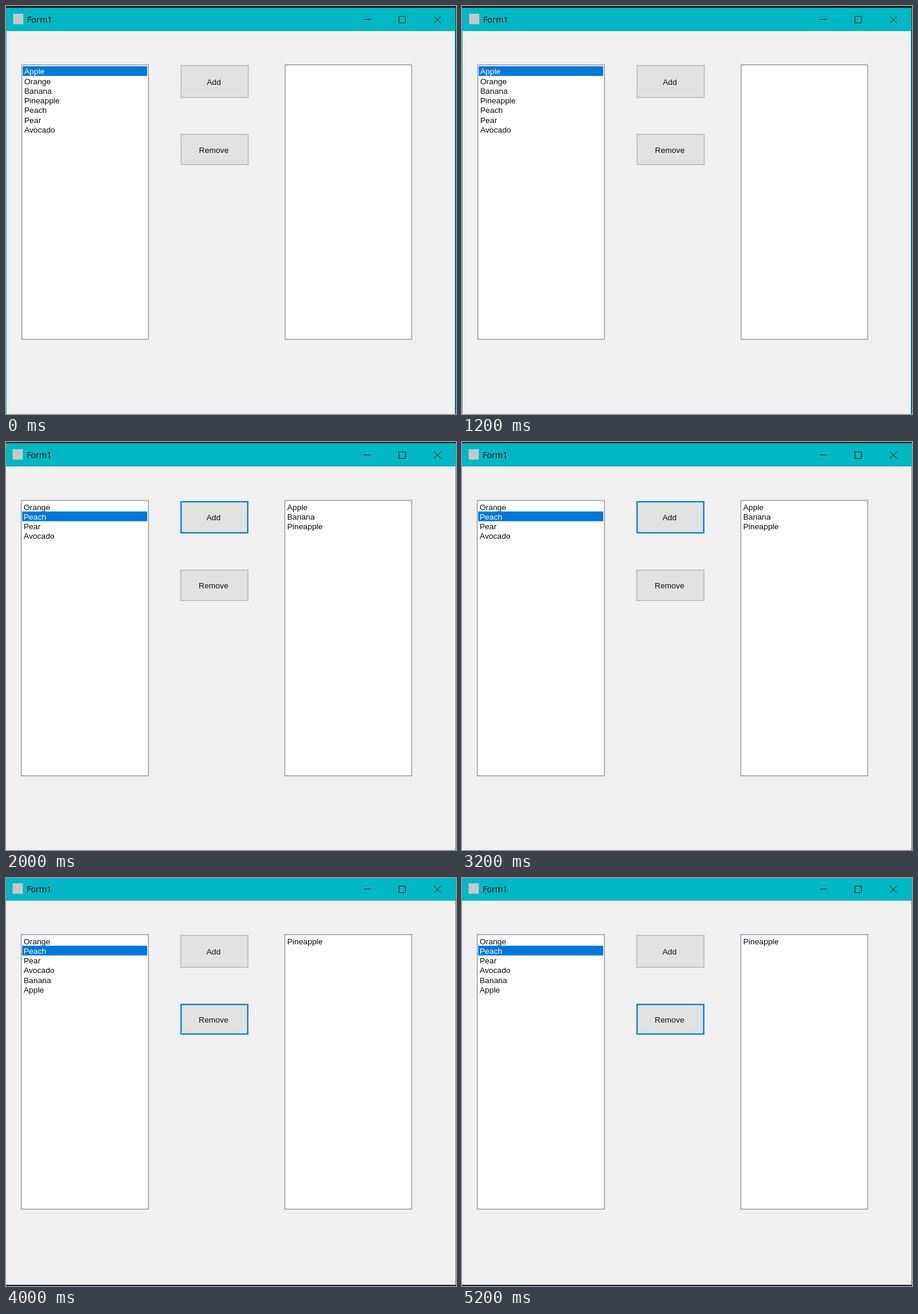
Animation of 752x683 px, one loop 6 s. Source, as an HTML page:

```html
<!DOCTYPE html>
<html lang="en">
<head>
<meta charset="utf-8">
<title>List transfer</title>
<style>
  html, body { margin: 0; width: 100%; height: 100%; overflow: hidden; background: #f0f0f0; }
  svg { display: block; }
  text { font: 13.3px "Liberation Sans", Arial, sans-serif; fill: #0c0c14; }
  .title { font: 13.7px "Open Sans", "Noto Sans", sans-serif; fill: #000; }
  .mid { text-anchor: middle; }
  .sel { fill: #fff; }
  .glyph { fill: none; stroke: #06191b; stroke-width: 1; }
  .scene { visibility: hidden; animation: show 6s step-end infinite; }
  @keyframes show {
    0% { visibility: visible; }
    33.3333%, 100% { visibility: hidden; }
  }
</style>
</head>
<body>
<svg id="stage" width="752" height="683" viewBox="0 0 752 683"></svg>
<script>
const ROW = 16.25;

// top: first teal row; bar: bottom of the title bar; dx: shift of left-aligned parts
const scenes = [
  {
    top: 3, bar: 42, dx: 0, listY: 98.5, listH: 459.5, edge: '#12383c',
    left: ['Apple', 'Orange', 'Banana', 'Pineapple', 'Peach', 'Pear', 'Avocado'],
    right: [], selected: 0, focus: '',
    add: [99.5, 53.5], remove: [215, 50.5]
  },
  {
    top: 2, bar: 41, dx: -1, listY: 97.8, listH: 461, edge: '#777',
    left: ['Orange', 'Peach', 'Pear', 'Avocado'],
    right: ['Apple', 'Banana', 'Pineapple'], selected: 1, focus: 'Add',
    add: [99.3, 53.2], remove: [214.5, 51]
  },
  {
    top: 0, bar: 38, dx: -1, listY: 94.8, listH: 459.5, edge: '#777',
    left: ['Orange', 'Peach', 'Pear', 'Avocado', 'Banana', 'Apple'],
    right: ['Pineapple'], selected: 1, focus: 'Remove',
    add: [96, 53.5], remove: [211, 50.7]
  }
];

const rect = (x, y, w, h, fill, stroke = 'none', sw = 1) =>
  `<rect x="${x}" y="${y}" width="${w}" height="${h}" fill="${fill}" stroke="${stroke}" stroke-width="${sw}"/>`;
const label = (x, y, str, cls = '') => `<text x="${x}" y="${y}" class="${cls}">${str}</text>`;

function listBox(x, w, s, items, selected = -1) {
  const rows = items.map((item, i) => {
    const y = s.listY + i * ROW;
    const on = i === selected;
    const mark = on ? rect(x + 1.5, y + 2.3, w - 3.5, 16.3, '#0078d7') : '';
    return mark + label(x + 4, y + 15.8, item, on ? 'sel' : '');
  });
  return rect(x, s.listY, w, s.listH, '#fff', '#82878f', 1.2) + rows.join('');
}

function button(s, name, [y, h]) {
  const on = s.focus === name;
  const x = 292.5 + s.dx / 2;
  const box = on
    ? rect(x + .5, y + .7, 111.5, h - 1.2, '#e1e1e1', '#0078d7', 2.2)
    : rect(x, y, 112.3, h, '#e1e1e1', '#adadad', 1.2);
  return box + label(347.3 + s.dx / 2, y + h / 2 + 5.4, name, 'mid');
}

function titleBar(s) {
  const y = s.bar - 19.5;
  return rect(0, 0, 752, s.top, '#151d20')
    + rect(0, s.top, 752, s.bar - s.top, '#00b7c3')
    + rect(12 + s.dx, y - 9.5, 17, 17.5, '#c4c8cc')
    + label(35.5 + s.dx, y + 5.2, 'Form1', 'title')
    + `<path class="glyph" d="M598 ${y}h12M656.5 ${y - 5}h11v11h-11zM715 ${y - 5.5}l12 12m0 -12l-12 12"/>`;
}

function frame(s, i) {
  if (i === 0) return rect(0, 3, 1, 680, '#00b7c3') + rect(750, 3, 1, 680, '#00b7c3') + rect(751, 0, 1, 683, s.edge);
  return rect(751, s.bar, 1, 683 - s.bar, s.edge) + (i === 2 ? rect(0, 681, 752, 2, '#20262a') : '');
}

document.getElementById('stage').innerHTML = scenes.map((s, i) =>
  `<g class="scene" style="animation-delay:${i * 2 - 6}s">`
  + rect(0, 0, 752, 683, '#f0f0f0')
  + titleBar(s)
  + listBox(26.5 + s.dx, 211.5 - s.dx, s, s.left, s.selected)
  + button(s, 'Add', s.add)
  + button(s, 'Remove', s.remove)
  + listBox(466.5 + s.dx / 2, 211.5 - s.dx / 2, s, s.right)
  + frame(s, i)
  + '</g>').join('');
</script>
</body>
</html>
```
